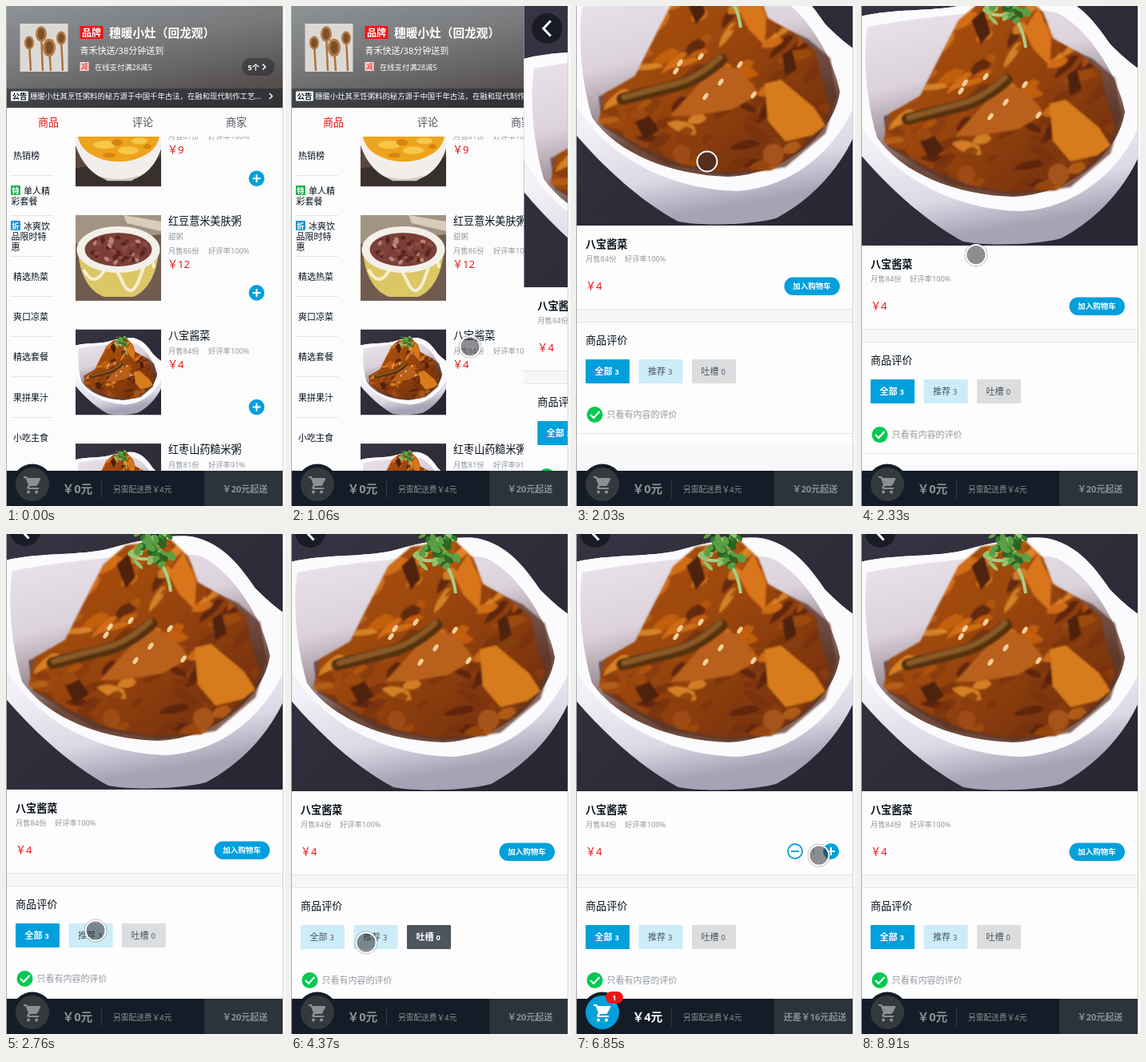
An HTML page for the animation above (9.62 s loop, 349x624 px).

```html
<!DOCTYPE html>
<html lang="zh-CN">
<head>
<meta charset="utf-8">
<title>商品详情</title>
<style>
html, body { margin: 0; width: 100%; height: 100%; overflow: hidden; background: #fff; }
svg.stage { display: block; width: 349px; height: 624px; }
text { font-family: "Noto Sans", "Noto Sans CJK SC", "Noto Sans CJK", sans-serif; fill: #07111b; white-space: pre; }
.s { font-size: 9.3px; }
.m { font-size: 11px; }
.l { font-size: 13.1px; }
.xl { font-size: 14.7px; }
.b { font-weight: 700; }
.w { fill: #fff; }
.g { fill: #93999f; }
.r { fill: #f01414; }
.c { text-anchor: middle; }
.line { stroke: #e2e4e6; }
.blue { fill: #00a0dc; }
.white { fill: none; stroke: #fff; }
.tag rect { fill: #ccecf8; }
.tag text { fill: #4d555d; }
.tag.bad rect { fill: #dbdddf; }
.tag.on rect { fill: #00a0dc; }
.tag.bad.on rect { fill: #4d555d; }
.tag.on text { fill: #fff; font-weight: 700; }
#bar text, #cartIcon { fill: #8b9096; }
#disc { fill: #34393e; }
#bar.full #disc { fill: #00a0dc; }
#bar.full #cartIcon, #bar.full #sum, #bar #badge text { fill: #fff; }
</style>
</head>
<body>
<svg class="stage" viewBox="0 0 349 624">
  <defs>
    <linearGradient id="head" x2=".55" y2="1">
      <stop stop-color="#8e9396"/><stop offset=".5" stop-color="#77787a"/><stop offset="1" stop-color="#534d4c"/>
    </linearGradient>
    <linearGradient id="china" x2=".2" y2="1">
      <stop offset=".6" stop-color="#f3f1f7"/><stop offset=".85" stop-color="#dcd8e5"/><stop offset="1" stop-color="#a7a3b5"/>
    </linearGradient>
    <linearGradient id="inner" x2=".35" y2="1">
      <stop stop-color="#ece4ec"/><stop offset=".4" stop-color="#dbd2dc"/><stop offset=".62" stop-color="#a3949b"/><stop offset=".8" stop-color="#6d4a3c"/>
    </linearGradient>
    <linearGradient id="night" y2="1">
      <stop stop-color="#373443"/><stop offset="1" stop-color="#282632"/>
    </linearGradient>
    <linearGradient id="gravy" y2="1">
      <stop stop-color="#b4560e"/><stop offset=".5" stop-color="#96430c"/><stop offset="1" stop-color="#6a2a0b"/>
    </linearGradient>
    <filter id="soft" x="0" y="0" width="1" height="1"><feGaussianBlur stdDeviation=".9"/></filter>
    <clipPath id="app"><rect x="1" width="345" height="580"/></clipPath>
    <clipPath id="listBox"><rect x="75" y="163" width="271" height="417"/></clipPath>
    <clipPath id="mound">
      <path d="M150 46L205 38 228 60 240 92 274 112 300 134 306 166 318 204 306 230 272 262 244 282 180 284 130 274 84 254 28 222 36 186 74 164 92 128 122 70Z"/>
    </clipPath>

    <symbol id="dish" viewBox="-5 0 351 351">
      <rect x="-5" width="351" height="351" fill="url(#night)"/>
      <path fill="url(#china)" d="M-5 66C40 54 90 60 130 50 180 36 215 32 236 36 275 46 295 76 312 100 326 114 340 126 350 132V234C330 282 292 320 250 342 220 350 160 352 128 346 90 326 40 286-5 232Z"/>
      <path fill="#fbfafc" d="M-5 66C40 54 90 60 130 50 180 36 215 32 236 36 275 46 295 76 312 100 326 114 340 126 350 132V196C330 250 276 304 200 308 120 306 36 268-5 192Z"/>
      <path fill="url(#inner)" d="M8 78C60 68 200 50 244 60 284 78 322 140 330 184 322 240 256 288 190 290 120 288 52 262 20 216 6 170 2 110 8 78Z"/>
      <path fill="#5b3022" filter="url(#soft)" opacity=".75" d="M28 190L250 100 290 118 318 142 326 190 312 236 262 278 190 288 110 274 34 228Z"/>
      <g filter="url(#soft)">
        <g id="food" clip-path="url(#mound)"><rect x="20" y="30" width="310" height="260" fill="url(#gravy)"/></g>
        <path fill="#d67c1c" d="M236 174L256 169 298 204 312 226 296 238 262 246 240 220Z"/>
        <path fill="#b9601a" d="M118 214L176 150 204 156 230 186 196 206 146 214Z"/>
        <path fill="#d9761c" d="M204 82L222 54 238 92 236 126 216 106Z"/>
        <path fill="#50200f" d="M138 70L154 56 162 86 150 100ZM258 138L270 130 276 156 262 164ZM74 222L92 214 104 232 86 244Z"/>
        <path fill="none" stroke="#55300f" stroke-width="15" stroke-linecap="round" d="M58 193Q96 184 124 177T182 144"/>
        <path fill="none" stroke="#8a5a27" stroke-width="7" stroke-linecap="round" d="M60 191Q96 181 124 174T180 141"/>
        <circle cx="247" cy="262" r="13" fill="#a5541a"/><circle cx="132" cy="262" r="11" fill="#a04c14"/>
      </g>
      <g id="sesame"></g>
      <g id="herb"></g>
    </symbol>

    <symbol id="soup" viewBox="0 0 107 107">
      <rect width="107" height="107" fill="#5a4740"/>
      <path fill="#38302d" d="M0 84L107 70V107H0Z"/>
      <path fill="#f1eeec" d="M-4 40H111C108 72 92 92 70 99H40C18 92 2 72-4 40Z"/>
      <path fill="#cfc8c5" d="M30 94Q55 102 80 93L70 100H40Z"/>
      <ellipse cx="54" cy="42" rx="51" ry="34" fill="#eda41d"/>
      <g fill="#f8c648"><ellipse cx="36" cy="55" rx="14" ry="5"/><ellipse cx="66" cy="62" rx="13" ry="5"/><ellipse cx="80" cy="50" rx="10" ry="4"/></g>
      <g fill="#d98210"><ellipse cx="52" cy="52" rx="7" ry="4"/><ellipse cx="42" cy="68" rx="8" ry="3"/><ellipse cx="90" cy="57" rx="5" ry="3"/></g>
    </symbol>

    <symbol id="bean" viewBox="0 0 107 107">
      <rect width="107" height="107" fill="#6f5c4f"/>
      <path fill="#a29383" d="M0 0H107V24L0 36Z"/>
      <path fill="#d8cdb8" d="M60 0L107 8V20L64 10Z"/>
      <path fill="#dcc765" d="M3 44H104C102 76 88 96 72 102H36C18 96 5 76 3 44Z"/>
      <path class="white" stroke-width="4" opacity=".7" d="M10 68Q22 90 34 72T58 82 82 74 98 66"/>
      <ellipse cx="53.500" cy="43" rx="52" ry="29" fill="#f3efe9"/>
      <ellipse cx="53.500" cy="43" rx="42" ry="21" fill="#7a4038"/>
      <g id="beans"></g>
    </symbol>
  </defs>

  <rect width="349" height="624" fill="#fff"/>
  <g id="shop">
    <rect x="1" width="345" height="580" fill="#fcfcfc"/>
    <rect x="1" width="345" height="127" fill="url(#head)"/>
    <rect x="1" y="103" width="345" height="24" fill="#07111b" opacity=".4"/>
    <rect x="17.500" y="22" width="60" height="60" fill="#dcd9d5"/>
    <g id="spoons"></g>
    <rect x="92.500" y="25" width="29" height="16" fill="#f01414"/>
    <text class="b w c" x="107" y="37.500" font-size="12">品牌</text>
    <text class="xl b w" x="129" y="38.500">穗暖小灶（回龙观）</text>
    <text class="m w" x="92.500" y="59.500">青禾快送/38分钟送到</text>
    <rect x="92.500" y="70" width="11" height="11" fill="#f6dcdb"/>
    <text class="r c" x="98" y="79" font-size="9">减</text>
    <text class="s w" x="111" y="80">在线支付满28减5</text>
    <rect x="295" y="65" width="41" height="22" rx="11" fill="#07111b" opacity=".35"/>
    <text class="s b w" x="302.500" y="79.500">5个</text>
    <path class="white" stroke-width="1.500" d="M321 72.500l3.500 3.500-3.500 3.500M329.500 109l3.500 3.500-3.500 3.500"/>
    <rect x="6" y="106.500" width="22" height="12" rx="1" fill="#fff"/>
    <text class="s b c" x="17" y="116">公告</text>
    <text class="w" x="30" y="116" font-size="9.400">穗暖小灶其烹饪粥料的秘方源于中国千年古法，在融和现代制作工艺…</text>
    <text class="l r c" x="53" y="149.500">商品</text>
    <text class="l c" x="171" y="149.500" style="fill:#4d555d">评论</text>
    <text class="l c" x="288" y="149.500" style="fill:#4d555d">商家</text>
    <g id="menu"></g>
    <g id="list" clip-path="url(#listBox)"></g>
  </g>

  <g clip-path="url(#app)">
    <g id="panel">
      <rect x="-5" width="351" height="580" fill="#f8f8fa"/>
      <g id="page">
        <use href="#dish" x="-5" width="351" height="351"/>
        <circle cx="24" cy="28" r="19" fill="#141722" opacity=".85"/>
        <path class="white" stroke-width="3" d="M28.500 18.500l-9 9.500 9 9.500"/>
        <rect x="-5" y="351" width="351" height="104.500" fill="#fdfdfd"/>
        <rect x="-5" y="455.500" width="351" height="16" fill="#f5f6f7"/>
        <rect x="-5" y="471.500" width="351" height="153" fill="#fdfdfd"/>
        <path class="line" d="M-5 455.500H346M-5 471.500H346M-5 610.500H346"/>
        <text class="l b" x="12" y="379">八宝酱菜</text>
        <text class="s g" x="12" y="396">月售84份</text>
        <text class="s g" x="61" y="396">好评率100%</text>
        <text class="l r" x="12" y="431">￥4</text>
        <g transform="translate(319 426)"><circle class="blue" r="10"/><path class="white" stroke-width="2" d="M-5 0H5M0-5V5"/></g>
        <g id="minus"><circle r="9" fill="#fff" stroke="#00a0dc" stroke-width="1.800"/><path stroke="#00a0dc" stroke-width="1.800" d="M-5 0H5"/></g>
        <text id="count" class="s g c" x="297" y="429.500"></text>
        <g id="add">
          <rect class="blue" x="260.500" y="415.500" width="69.500" height="22.500" rx="11.250"/>
          <text class="b w c" x="295" y="430.200" font-size="9.500">加入购物车</text>
        </g>
        <text class="l" x="12" y="499">商品评价</text>
        <g id="tags"></g>
        <circle cx="23.500" cy="587" r="10" fill="#00c850"/>
        <path class="white" stroke-width="2.200" d="M18 587l4 4 7.500-8"/>
        <text class="m g" x="38.500" y="591">只看有内容的评价</text>
      </g>
    </g>
  </g>

  <g id="bar">
    <rect x="1" y="580" width="345" height="44" fill="#141d27"/>
    <rect x="248" y="580" width="98" height="44" fill="#2b333b"/>
    <circle cx="33" cy="597" r="25.500" fill="#141d27"/>
    <circle id="disc" cx="33" cy="597" r="21"/>
    <path id="cartIcon" d="M22 587h4l1 2h15q2 0 1 2l-3.500 6.500q-.8 1.500-2.500 1.500h-7l-1 2h12v2h-13q-2.500-.5-1.500-3l1.500-2.500-3.500-8.500H22zM28 604.500a2 2 0 1 0 .1 0zM38 604.500a2 2 0 1 0 .1 0z"/>
    <g id="badge">
      <rect x="37" y="571" width="22" height="15" rx="7.500" fill="#f01414"/>
      <text class="s b c" x="48" y="582"></text>
    </g>
    <text id="sum" class="xl b" x="70.500" y="608"></text>
    <path stroke="#323a43" d="M119.500 592V614"/>
    <text x="134" y="606.500" font-size="9.700">另需配送费￥4元</text>
    <text id="pay" class="m b c" x="299" y="606.500"></text>
  </g>

  <path stroke="#a9a9a9" d="M.5 0V624"/>
  <path stroke="#cfcfcf" d="M346.500 0V624"/>
  <g id="touch">
    <circle r="14" fill="none" stroke="#000" stroke-opacity=".3"/>
    <circle r="12.500" fill="#28282e" fill-opacity=".52" stroke="#fff" stroke-width="2"/>
  </g>
</svg>

<script>
const $ = id => document.getElementById(id);
const put = (id, markup) => $(id).innerHTML += markup;
const text = (cls, x, y, s) => `<text class="${cls}" x="${x}" y="${y}">${s}</text>`;

let seed = 11;
const rnd = (a, b) => a + (b - a) * ((seed = seed * 16807 % 2147483647) / 2147483647);
const pick = list => list[Math.floor(rnd(0, list.length))];
const many = (n, make) => Array.from({ length: n }, make).join('');
const blob = (x, y, rx, ry, turn, fill) =>
  `<ellipse rx="${rx}" ry="${ry}" fill="${fill}" transform="translate(${x} ${y}) rotate(${turn})"/>`;

// Pictures: strips hang steeply at the top of the mound and lie flatter and darker below.
const bright = ['#c8620f', '#d9741a', '#b4560e', '#e08a2a', '#8a3b0c'];
const dark = ['#a04a10', '#7a330c', '#5a2410', '#b8621a', '#883c0c'];
put('food', many(130, () => {
  const w = rnd(9, 24), h = rnd(4, 9), y = rnd(45, 285), low = (y - 45) / 240;
  const turn = rnd(-80, -35) + low * rnd(20, 90);
  return `<path fill="${pick(rnd(.1, .9) < low ? dark : bright)}" opacity=".85"
    transform="translate(${rnd(25, 318)} ${y}) rotate(${turn})"
    d="M${-w} 0Q${-w * .5} ${-h * 1.4} ${w * .7} ${-h * .8}L${w} ${h * .3}Q${w * .2} ${h * 1.4} ${-w} 0Z"/>`;
}));
put('sesame', [[125, 158], [130, 148], [162, 190], [181, 172], [205, 150], [222, 188], [156, 140]]
  .map(([x, y]) => blob(x, y, 5, 2.6, -55, '#f0cf9a')).join(''));
put('herb', '<path stroke="#a8cf86" stroke-width="4" fill="none" d="M186 60Q202 74 206 104M186 62Q166 66 156 58"/>' + many(44, () => {
  const a = rnd(0, 6.28), d = rnd(2, 31);
  return blob(180 + Math.cos(a) * d, 50 + Math.sin(a) * d * .8, rnd(4, 8), rnd(2, 4.5), rnd(0, 180), pick(['#2f7d2b', '#5a9f45', '#93c16c', '#2a6522']));
}));
put('beans', many(45, () => {
  const a = rnd(0, 6.28), d = Math.sqrt(rnd(0, 1));
  return blob(53.5 + Math.cos(a) * d * 37, 43 + Math.sin(a) * d * 17, 3.5, 2.3, rnd(0, 180), pick(['#5a2420', '#8f4c42', '#b98578', '#6b2c28']));
}));
put('spoons', [[29, 46, 6], [44, 35, 7], [54, 52, 8], [69, 40, 6]].map(([x, y, r]) =>
  `<path stroke="#a9743f" stroke-width="2.500" d="M${x} ${y}L${x + 2} 81"/>` +
  blob(x, y, r, r * 1.4, 0, '#b07a44') + blob(x, y, r * .6, r, 0, '#7d4f28')).join(''));

// Left menu
const icon = (y, fill, s) => `<rect x="6" y="${y}" width="12" height="12" rx="1" fill="${fill}"/>` +
  `<text class="s b w c" x="12" y="${y + 9.5}">${s}</text>`;
put('menu', ['热销榜', , , '精选热菜', '爽口凉菜', '精选套餐', '果拼果汁', '小吃主食']
  .map((s, i) => text('m', 9, 191 + i * 50.25, s)).join('') +
  many(7, (_, i) => `<path class="line" d="M6 ${211.5 + Math.round(i * 50.25)}H59"/>`) +
  icon(224, '#1fb34f', '特') + text('m', 22, 235, '单人精') + text('m', 6.5, 248, '彩套餐') +
  icon(268, '#1d93d2', '折') + text('m', 22, 279, '冰爽饮') + text('m', 6.5, 292, '品限时特') + text('m', 6.5, 305, '惠'));

// Goods list
const goods = [
  ['soup', '南瓜粥', '甜粥', 81, 100, 9],
  ['bean', '红豆薏米美肤粥', '甜粥', 86, 100, 12],
  ['dish', '八宝酱菜', '', 84, 100, 4],
  ['dish', '红枣山药糙米粥', '', 81, 91, 10]
];
put('list', goods.map(([pic, name, note, sold, rate, price], i) => {
  const y = 118.3 + i * 142.6, drop = note ? 18 : 0;
  return `<use href="#${pic}" x="87" y="${y}" width="107" height="107"/>` +
    text('l', 203, y + 12.3, name) + text('s g', 203, y + 30, note) +
    text('s g', 203, y + 30 + drop, `月售${sold}份`) + text('s g', 253, y + 30 + drop, `好评率${rate}%`) +
    text('l r', 202, y + 48 + drop, '￥' + price) +
    `<g transform="translate(313.500 ${y + 97})"><circle class="blue" r="9.800"/><path class="white" stroke-width="2" d="M-5 0H5M0-5V5"/></g>`;
}).join(''));

put('tags', [['全部', 3], ['推荐', 3], ['吐槽', 0]].map(([s, n], i) =>
  `<g class="tag${i == 2 ? ' bad' : ''}" transform="translate(${12 + i * 66.5} 518)"><rect width="55" height="30" rx="1"/>` +
  text('m', 11.5, 19, s) + text('s', 36.5, 19, n) + '</g>').join(''));

// Timing: the picture moves in short bursts of even steps and rests between them.
const loop = 9620;
const bursts = [
  [150, 660, 5], [1060, 2030, 8], [2190, 3060, 7], [3310, 3550, 3], [3960, 4910, 8],
  [5190, 5190, 1], [5470, 6270, 7], [6550, 7090, 5], [7390, 7940, 5], [8370, 8910, 5]
];
function held(t) {
  let at = 0;
  for (const [a, b, n] of bursts) {
    if (t < a) break;
    const gap = (b - a) / (n - 1) || 1;
    at = a + gap * Math.min(n - 1, Math.floor((t - a + 12) / gap));
  }
  return at;
}
function track(t, keys) {
  const i = keys.findIndex(k => k[0] > t);
  if (i == 0) return keys[0].slice(1);
  if (i < 0) return keys[keys.length - 1].slice(1);
  const [a, ...from] = keys[i - 1], [b, ...to] = keys[i], p = (t - a) / (b - a);
  return from.map((v, j) => v + (to[j] - v) * p);
}
const state = (t, keys) => keys.filter(k => k[0] <= t).pop()[1];

const finger = [
  [150, 232, 521], [405, 213, 462], [532, 212, 432], [660, 224, 425], [1340, 224, 425],
  [1620, 180, 365], [2030, 164, 194], [2060, 164, 194], [2770, 112, 495], [3180, 112, 495],
  [3550, 171, 503], [3960, 171, 503], [4367, 94, 510], [4640, 94, 516], [4910, 34, 508],
  [5340, 34, 508], [6270, 304, 402], [6830, 304, 401], [7090, 315, 399], [7390, 315, 399],
  [7660, 292, 377], [7940, 274, 398]
];
const slide = [[1000, 351], [1385, 0]];
const drag = [[1620, 0], [1720, 30], [2030, 77]];
const roll = [[6500, 0], [6800, 1], [8330, 1], [8640, 0]];
const fade = [[6500, 1], [6680, 0], [8330, 0], [8600, 1]];
const tagOn = [[0, 0], [3960, 2], [4500, 1], [5190, 0]];
const amount = [[0, 0], [6550, 1], [7390, 2], [7800, 1], [8370, 0]];

function scrollAt(t) {
  if (t <= 2045) return track(t, drag)[0];
  const rest = Math.max(0, 1 - (t - 2045) / 915);
  return 30 + 47 * rest * rest;
}

const tags = [...document.querySelectorAll('.tag')];
const move = (id, x, y, more = '') => $(id).setAttribute('transform', `translate(${x} ${y}) ${more}`);
const show = (id, on) => $(id).style.display = on ? '' : 'none';

function draw(t) {
  const [shift] = track(t, slide), [s] = track(t, roll), n = state(t, amount), [x, y] = track(t, finger);
  show('panel', shift < 351);
  move('panel', shift, 0);
  move('page', 0, -scrollAt(t));
  tags.forEach((tag, i) => tag.classList.toggle('on', i == state(t, tagOn)));

  move('minus', 274 + 24 * (1 - s), 426, `rotate(${180 * (1 - s)})`);
  $('minus').style.opacity = s;
  $('add').style.opacity = track(t, fade)[0];
  $('count').textContent = n || '';

  $('bar').classList.toggle('full', n > 0);
  show('badge', n > 0);
  $('badge').lastElementChild.textContent = n;
  $('sum').textContent = `￥${n * 4}元`;
  $('pay').textContent = n ? `还差￥${20 - n * 4}元起送` : '￥20元起送';

  show('touch', t >= 150 && t < 8900);
  move('touch', x, y);
}

const start = performance.now();
let last = -1;
function tick(now) {
  const t = held(Math.max(0, now - start) % loop);
  if (t != last) draw(last = t);
  requestAnimationFrame(tick);
}
tick(start);
</script>
</body>
</html>
```
